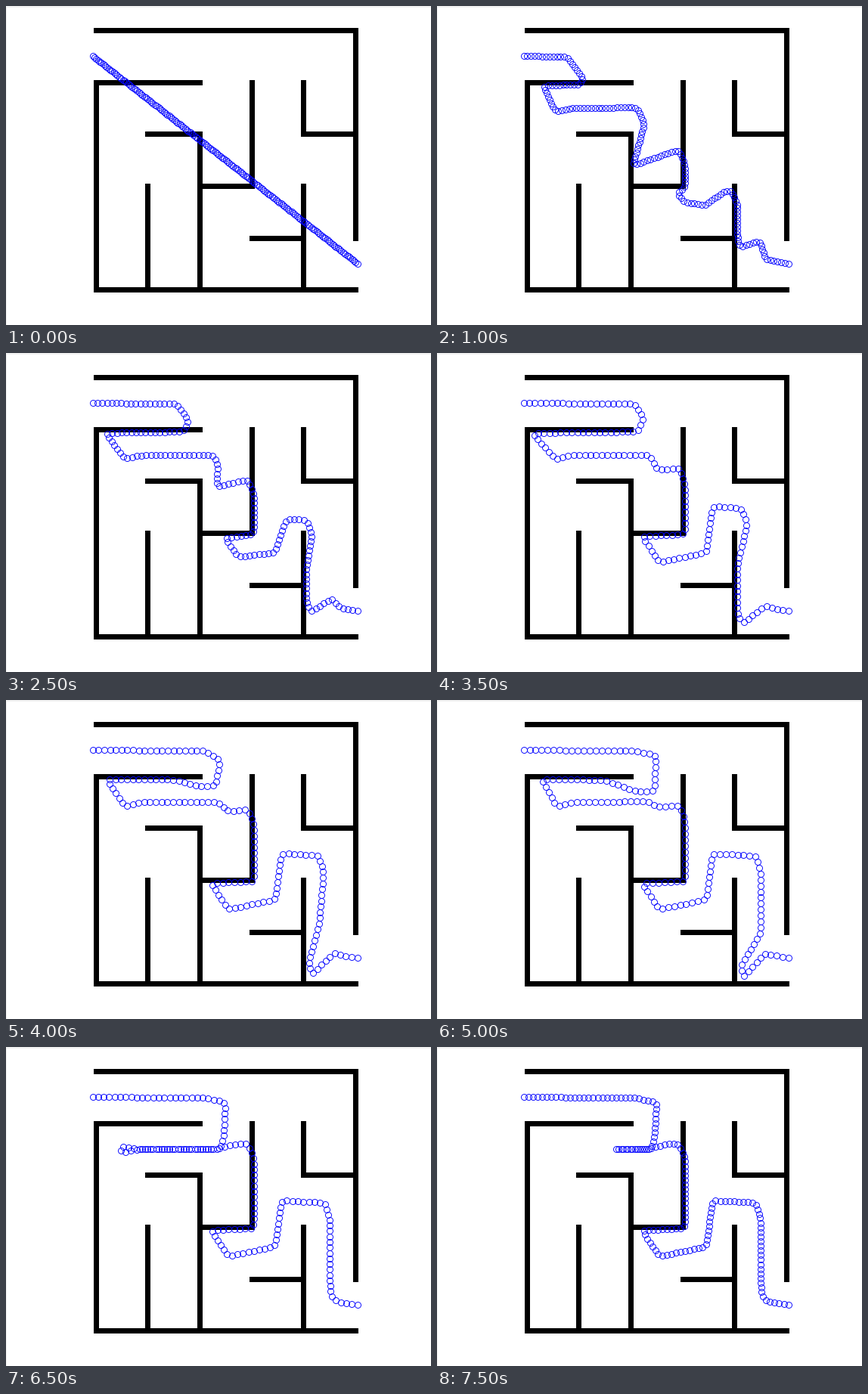
Animation of 562x422 px, one loop 8 s. Source, as a matplotlib script:

```python
import numpy as np
import matplotlib.pyplot as plt
from matplotlib.animation import FuncAnimation

W, H, DPI = 562, 422, 64
PX = 72 / DPI          # one pixel in points
COUNT = 150            # markers along the path
ROUND = 11             # corner rounding in pixels
START, END = (114.6, 66.2), (464.6, 340.6)

# Walls as grid cells: (column, row) to (column, row)
WALLS = [
    (0, 0, 5, 0), (5, 0, 5, 4), (0, 5, 5, 5), (0, 1, 0, 5),
    (0, 1, 2, 1), (1, 2, 2, 2), (2, 3, 3, 3), (3, 4, 4, 4), (4, 2, 5, 2),
    (1, 3, 1, 5), (2, 2, 2, 5), (3, 1, 3, 3), (4, 1, 4, 2), (4, 3, 4, 5),
]

# Corners that several poses share
ROW = [(176, 135.5)]
HEAD = [(260, 67), (290, 73)]
POCKET = [(327.5, 240), (271, 242.5), (294, 277), (356, 264), (364, 203)]
EXIT = [(434, 334), (445, 338)]


def pose(*parts):
    return np.array([START, *sum(parts, []), END], float)


def hairpin(tip, gap):
    """Path whose second corridor has shrunk to a fold ending at x = tip."""
    y = 135.5
    fold = [(288, 118), (283, y), (tip + 22, y), (tip, y - gap),
            (tip, y + gap), (tip + 22, y), (275, y)]
    return pose(HEAD, fold,
                [(290, 132), (300, 129), (318, 127), (327.5, 145)], POCKET,
                [(422, 206), (428, 228), (428, 280), (428, 310),
                 (430, 331), (436, 336), (448, 339)])


loose = pose(
    [(171, 67), (194, 97), (188, 104), (170, 104.5), (155, 104.5),
     (140, 106), (157, 140)], ROW,
    [(264, 134), (274, 156), (259, 211), (319, 190), (327.5, 208)],
    [(327.5, 240), (317, 248), (327, 259), (354, 264), (381, 244)],
    [(390, 245), (397, 262), (397.5, 285), (397.5, 312), (401, 319),
     (427, 310), (434, 335)])

wide = pose(
    [(262, 67), (273, 86), (266, 104), (245, 104.5), (220, 104.5),
     (126, 106), (157, 141)], ROW,
    [(279, 135), (284, 140), (291, 155), (320, 152), (327.5, 172)], POCKET,
    [(402, 205), (410, 227), (397, 280), (397, 345), (404, 358)], EXIT)

looped = pose(
    HEAD,
    [(287, 121), (262, 121), (222, 106), (138, 104.5), (158, 141)], ROW,
    [(280, 134), (288, 140), (295, 142), (319, 139), (327.5, 156)], POCKET,
    [(422, 206), (428, 228), (428, 307), (402, 352), (405, 367)], EXIT)


def arc(points):
    steps = np.hypot(*np.diff(points, axis=0).T)
    return np.concatenate([[0], np.cumsum(steps)])


def along(points, at):
    """Points at the given fractions of the path's length."""
    s = arc(points)
    return np.column_stack([np.interp(at * s[-1], s, c) for c in points.T])


def rounded(points):
    """Moving average along the path; both ends stay put."""
    fine = along(points, np.linspace(0, 1, int(arc(points)[-1])))
    half = ROUND // 2
    fine = np.pad(fine, ((half, half), (0, 0)), "reflect", reflect_type="odd")
    box = np.ones(ROUND) / ROUND
    return np.column_stack([np.convolve(c, box, "valid") for c in fine.T])


share = arc(loose) / arc(loose)[-1]
straight = along(np.array([START, END], float), share)

# When each pose is reached, and how strongly the move to it slows down
KEYS = [(0, straight, 1), (2, loose, 2), (7, wide, 1), (10, looped, 2),
        (13, hairpin(152, 5), 3), (15, hairpin(233, 0), 1)]
FRAMES = KEYS[-1][0] + 1


def shape(i):
    for (t0, a, _), (t1, b, power) in zip(KEYS, KEYS[1:]):
        if i <= t1:
            return a + (b - a) * (1 - (1 - (i - t0) / (t1 - t0)) ** power)


fig = plt.figure(figsize=(W / DPI, H / DPI), dpi=DPI, facecolor="white")
ax = fig.add_axes([0, 0, 1, 1])
ax.set(xlim=(0, W), ylim=(H, 0))
ax.axis("off")

# Window edge
ax.fill_between([0, W], 0, 2, color="#f0f0f0", lw=0)
ax.fill_between([0, 1], 0, H, color="#f0f0f0", lw=0)

for c0, r0, c1, r1 in WALLS:
    xs = 118.7 + 68.65 * np.array([c0, c1])
    ys = 32.2 + 68.6 * np.array([r0, r1])
    ax.plot(xs, ys, color="black", lw=7 * PX, solid_capstyle="projecting")

chain, = ax.plot([], [], "o", ms=8 * PX, mfc="none", mec="blue", mew=0.9 * PX)


def draw(i):
    chain.set_data(*along(rounded(shape(i)), np.linspace(0, 1, COUNT)).T)
    return chain,


anim = FuncAnimation(fig, draw, frames=FRAMES, interval=500,
                     repeat=True, repeat_delay=0)
plt.show()
```
